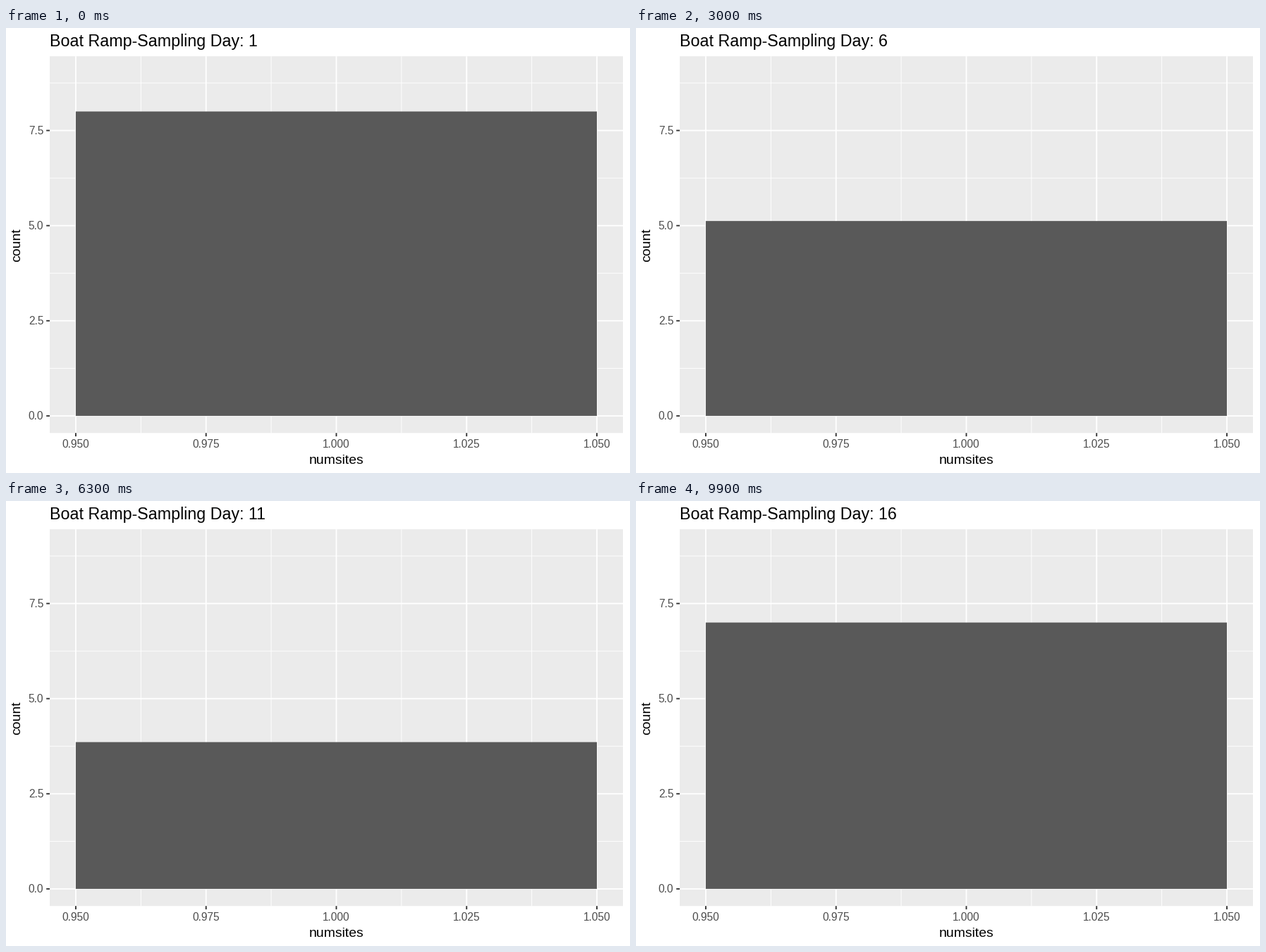
A matplotlib script that plays this animation: 885 px wide and 632 px high, repeating every 10 s.

```python
import numpy as np
import matplotlib.pyplot as plt
from matplotlib.animation import FuncAnimation
from matplotlib.patches import Rectangle

W, H, DPI = 885, 632, 64
FRAMES, INTERVAL = 100, 100
PX = 72 / DPI  # points per pixel

plt.rcParams["font.family"] = "Liberation Sans"

# Panel edges in pixels, y measured downwards
LEFT, RIGHT, TOP, BOTTOM = 62.0, 875.0, 40.2, 575.2
X_MIN, X_MAX, Y_MAX = 0.95, 1.05, 9

# Sampled days and the number of counts on each
DAYS = np.array([1, 2, 3, 8, 9, 10, 11, 12, 13, 14, 15, 16])
COUNTS = np.array([8, 4, 1, 9, 9, 5, 3, 1, 7, 7, 6, 7])
LAST = DAYS[-1] - DAYS[0]
KEYS = np.round((FRAMES - 1) * (DAYS - DAYS[0]) / LAST)


def px(v):
    pad = (RIGHT - LEFT) * 0.05 / 1.1
    return LEFT + pad + (v - X_MIN) / (X_MAX - X_MIN) * (RIGHT - LEFT - 2 * pad)


def py(v):
    pad = (BOTTOM - TOP) * 0.05 / 1.1
    return BOTTOM - pad - v / Y_MAX * (BOTTOM - TOP - 2 * pad)


fig = plt.figure(figsize=(W / DPI, H / DPI), dpi=DPI, facecolor="white")
ax = fig.add_axes([0, 0, 1, 1])
ax.set_xlim(0, W)
ax.set_ylim(H, 0)
ax.axis("off")


def rect(x0, y0, x1, y1, color, z):
    return ax.add_patch(Rectangle((x0, y0), x1 - x0, y1 - y0, facecolor=color,
                                  linewidth=0, zorder=z, snap=False))


def line(xs, ys, width, color, z):
    ax.plot(xs, ys, color=color, lw=width * PX, zorder=z, snap=False,
            solid_capstyle="butt")


def label(x, y, s, size, color="black", **kw):
    return ax.text(x, y, s, fontsize=size * PX, color=color,
                   va=kw.pop("va", "baseline"), **kw)


def grid_x(v, width, z):
    line([px(v)] * 2, [TOP, BOTTOM], width, "white", z)


def grid_y(v, width, z):
    line([LEFT, RIGHT], [py(v)] * 2, width, "white", z)


rect(LEFT, TOP, RIGHT, BOTTOM, "#EBEBEB", 1)

for v in (1.25, 3.75, 6.25, 8.75):
    grid_y(v, 0.94, 2)
for v in (0.9625, 0.9875, 1.0125, 1.0375):
    grid_x(v, 0.94, 2)

TICK = 4.8
for v in (0, 2.5, 5, 7.5):
    grid_y(v, 1.88, 3)
    line([LEFT - TICK, LEFT], [py(v)] * 2, 1.88, "#333333", 5)
    label(LEFT - 8.7, py(v) + 5.5, f"{v:.1f}", 15.5, "#4D4D4D", ha="right")
for v in (0.95, 0.975, 1, 1.025, 1.05):
    grid_x(v, 1.88, 3)
    line([px(v)] * 2, [BOTTOM, BOTTOM + TICK], 1.88, "#333333", 5)
    label(px(v), 596, f"{v:.3f}", 15.5, "#4D4D4D", ha="center")

label((LEFT + RIGHT) / 2, 619, "numsites", 19.4, ha="center")
label(24, (TOP + BOTTOM) / 2, "count", 19.4, ha="right", va="center",
      rotation=90)
title = label(LEFT, 26, "", 23.2, ha="left")
bar = rect(px(X_MIN), py(0), px(X_MAX), py(0), "#595959", 4)


def update(i):
    day = DAYS[0] + LAST * i / (FRAMES - 1)
    title.set_text(f"Boat Ramp-Sampling Day: {round(day)}")
    top = py(np.interp(i, KEYS, COUNTS))
    bar.set_y(top)
    bar.set_height(py(0) - top)
    return title, bar


anim = FuncAnimation(fig, update, frames=FRAMES, interval=INTERVAL,
                     repeat=True, repeat_delay=0, blit=False)
plt.show()
```
